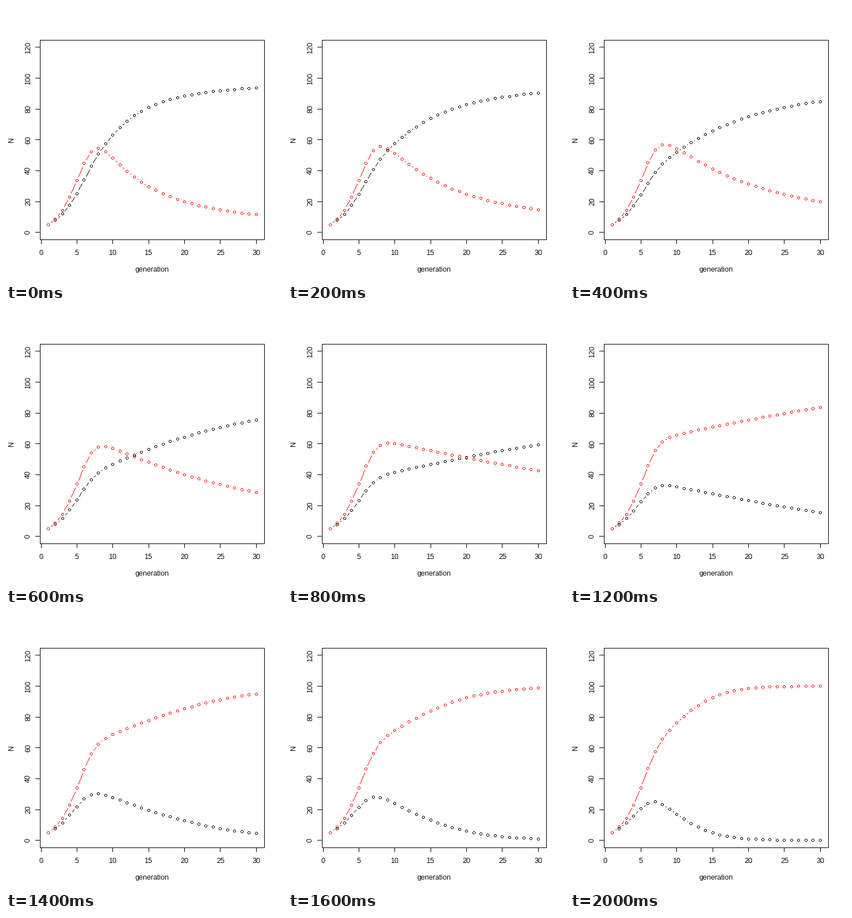
A matplotlib script that plays this animation: 480x480 px, repeating every 2200 ms.

```python
import numpy as np
import matplotlib.pyplot as plt
from matplotlib.animation import FuncAnimation
from matplotlib.collections import PolyCollection
from matplotlib.patches import Rectangle

plt.rcParams.update({
    "font.family": "Liberation Sans",
    "font.size": 9,
    "text.hinting": "native",
    "text.hinting_factor": 1,
})

SIZE = 480
GENERATIONS = 30
FRAMES = 11
CAPACITY = 100
RATES = 0.6, 0.8
GAP = 7.2  # space left free around each point

# Plot region in pixels, with 4 % padding around the data ranges
LEFT, TOP, RIGHT, BOTTOM = 59.04, 59.04, 449.76, 406.56
X_UNIT = (RIGHT - LEFT) / (29 * 1.08)
Y_UNIT = (BOTTOM - TOP) / (120 * 1.08)

SQUARE = np.array([(0, 0), (1, 0), (1, 1), (0, 1)])
RING = np.array([(a, b) for s in (-2, 2) for t in (-1, 0, 1)
                 for a, b in ((s, t), (t, s))])


def px(gen):
    return LEFT + (gen - 1 + 29 * 0.04) * X_UNIT


def py(n):
    return BOTTOM - (n + 120 * 0.04) * Y_UNIT


def compete(alpha):
    """Two competing species; alpha is the pressure of the second on the first."""
    a, b = 5.0, 5.0
    rows = [(a, b)]
    for _ in range(GENERATIONS - 1):
        a, b = (a + RATES[0] * a * (1 - (a + alpha * b) / CAPACITY),
                b + RATES[1] * b * (1 - (a + b) / CAPACITY))
        rows.append((a, b))
    return np.array(rows).T


def stroke(p, q):
    """Pixels of a one-pixel line from p to q."""
    p, q = np.floor(p), np.floor(q)
    steps = int(np.abs(q - p).max())
    t = np.linspace(0, 1, steps + 1)[:, None]
    return np.floor(p + (q - p) * t + 0.5)


def curve_pixels(values):
    gens = np.arange(1, GENERATIONS + 1)
    pts = np.column_stack([px(gens), py(values)])
    parts = [np.floor(p) + RING for p in pts]
    for p, q in zip(pts, pts[1:]):
        length = np.hypot(*(q - p))
        if length > 2 * GAP:
            inset = (q - p) * GAP / length
            parts.append(stroke(p + inset, q - inset))
    return np.vstack(parts)


def squares(pixels):
    return pixels[:, None, :] + SQUARE


fig = plt.figure(figsize=(5, 5), dpi=96, facecolor="white")
ax = fig.add_axes([0, 0, 1, 1])
ax.set_xlim(0, SIZE)
ax.set_ylim(SIZE, 0)
ax.axis("off")


def bar(x0, y0, x1, y1):
    """Black bar covering both end pixels."""
    ax.add_patch(Rectangle((x0, y0), x1 - x0 + 1, y1 - y0 + 1,
                           fc="black", lw=0, aa=False))


def label(x, y, text, rotation=0):
    ax.text(x, y, text, rotation=rotation, rotation_mode="anchor",
            ha="center", va="baseline", color="black")


x0, y0, x1, y1 = (int(v) for v in (LEFT, TOP, RIGHT, BOTTOM))
bar(x0, y0, x1, y0)
bar(x0, y1, x1, y1)
bar(x0, y0, x0, y1)
bar(x1, y0, x1, y1)

for gen in range(0, 31, 5):
    x = int(px(gen))
    bar(x, y1, x, y1 + 7)
    label(px(gen), 433, str(gen))
for n in range(0, 121, 20):
    y = int(py(n))
    bar(x0 - 8, y, x0, y)
    label(42, py(n), str(n), 90)
label((LEFT + RIGHT) / 2, 462, "generation")
label(13, (TOP + BOTTOM) / 2, "N", 90)

curves = [PolyCollection([], facecolors=c, edgecolors="none", linewidths=0,
                         antialiaseds=False, zorder=z)
          for z, c in ((3, "black"), (4, "red"))]
for curve in curves:
    ax.add_collection(curve, autolim=False)


def update(frame):
    for curve, values in zip(curves, compete(0.5 + frame / 10)):
        curve.set_verts(squares(curve_pixels(values)))
    return curves


anim = FuncAnimation(fig, update, frames=FRAMES, interval=200,
                     init_func=lambda: update(0), repeat=True, repeat_delay=0)
plt.show()
```
